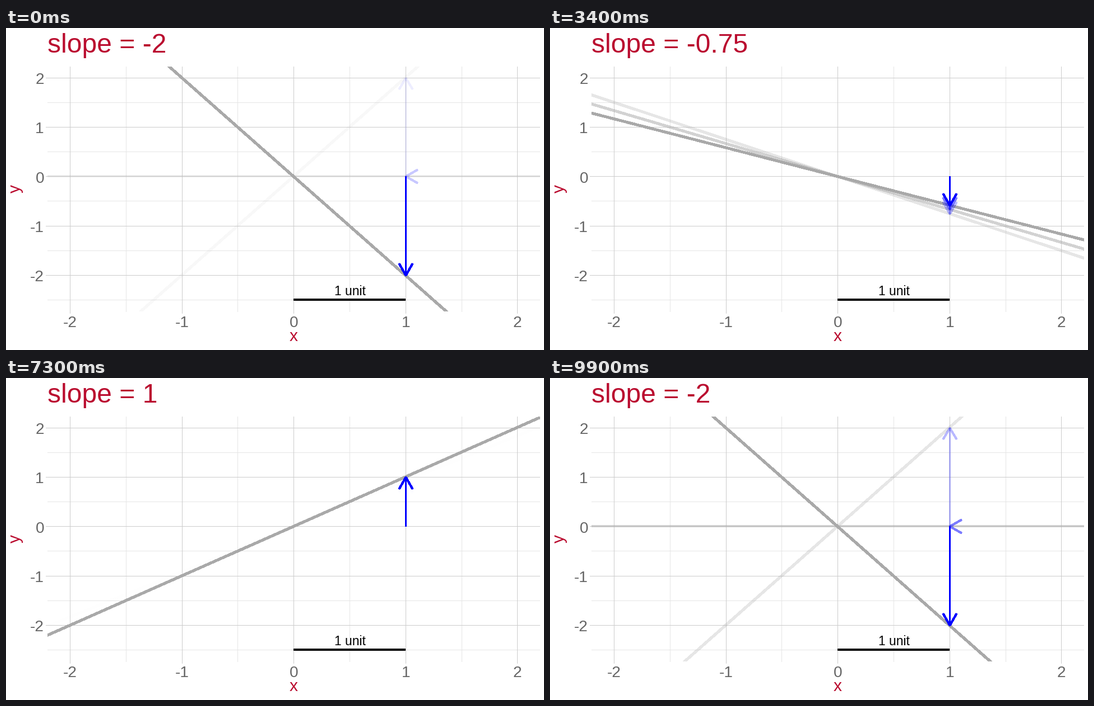
These frames come from a looping animation (960x576 px, 10 s). A matplotlib script:

```python
import math

import matplotlib.pyplot as plt
import numpy as np
from matplotlib.animation import FuncAnimation
from matplotlib.patches import Rectangle

W, H, DPI = 960, 576, 96
FRAMES, INTERVAL = 100, 100
LEFT, RIGHT, TOP, BOTTOM = 74, 953, 69, 507
RED, GREY, LINE, BLUE = "#BA0C2F", "#666666", "#A9A9A9", "#0000FF"
THICK, ARROW = 4, 3
HEAD, HEAD_ANGLE = 24, math.radians(30)
TICK = 3
WAKE = 5

plt.rcParams["font.family"] = "Liberation Sans"


def pt(px):
    return px * 72 / DPI


def sx(x):
    return 513.7 + 199.55 * x


def sy(y):
    return 265.8 - 88.35 * y


# Each state holds, then moves linearly to the next; the last wraps around.
STATES = np.arange(-2, 2.01, 0.25)
SEGMENTS = 2 * len(STATES)
KNOTS = [max(0, math.ceil(FRAMES * n / SEGMENTS) - 1) for n in range(SEGMENTS + 1)]
VALUES = np.append(np.repeat(STATES, 2), STATES[0])


def slope_at(frame):
    return float(np.interp(frame % FRAMES, KNOTS, VALUES))


def state_at(frame):
    landed = [v for k, v in zip(KNOTS, VALUES) if k <= frame]
    return landed[-1]


fig = plt.figure(figsize=(W / DPI, H / DPI), dpi=DPI, facecolor="white")
ax = fig.add_axes([0, 0, 1, 1])
ax.set_xlim(0, W)
ax.set_ylim(H, 0)
ax.axis("off")
panel = Rectangle((LEFT, TOP), RIGHT - LEFT, BOTTOM - TOP, transform=ax.transData)


def place(line, xs, ys, width):
    """Put vertices on whole pixels, centred for odd pen widths."""
    shift = width % 2 / 2
    line.set_data(np.floor(xs) + shift, np.floor(ys) + shift)


def stroke(xs, ys, color, width, alpha=1, clip=True):
    line, = ax.plot([], [], color=color, lw=pt(width), alpha=alpha,
                    antialiased=False, snap=False, solid_capstyle="butt",
                    solid_joinstyle="round", clip_on=clip)
    if clip:
        line.set_clip_path(panel)
    place(line, xs, ys, width)
    return line


def label(x, y, text, size, color, ha="center", **kw):
    return ax.text(x, y, text, fontsize=pt(size), color=color, ha=ha,
                   va="baseline", **kw)


def grid(xs, ys, color, tick=0):
    for x in xs:
        stroke([sx(x)] * 2, [TOP, BOTTOM + tick], color, 1, clip=False)
    for y in ys:
        stroke([LEFT - tick, RIGHT - 1], [sy(y)] * 2, color, 1, clip=False)


grid(np.arange(-1.5, 2), np.arange(-2.5, 2), "#E5E5E5")
grid(range(-2, 3), range(-2, 3), "#CCCCCC", TICK)
for v in range(-2, 3):
    label(sx(v), 535, str(v), 28, GREY)
    label(68, sy(v) + 10.8, str(v), 28, GREY, "right")
label(513, 560, "x", 30, RED)
label(25, 287.5, "y", 30, RED, rotation=90, rotation_mode="anchor")
title = label(LEFT, 44, "", 48, RED, "left")

# Oldest trace first, the current one (lag 0) on top.
lags = range(WAKE - 1, -1, -1)
fade = {lag: (1 - lag / WAKE) ** 3 for lag in lags}
lines = {lag: stroke([], [], LINE, THICK, fade[lag]) for lag in lags}
arrows = {lag: [stroke([], [], BLUE, ARROW, fade[lag]) for _ in range(2)]
          for lag in lags}

stroke([sx(0), sx(1)], [sy(-2.5)] * 2, "black", THICK)
label(sx(0.5), 478, "1 unit", 22.7, "black")


def head_points(slope):
    x, y = sx(1), sy(slope)
    # A zero-length arrow points left.
    back = 0 if slope == 0 else math.copysign(math.pi / 2, slope)
    a, b = back - HEAD_ANGLE, back + HEAD_ANGLE
    return ([x + HEAD * math.cos(a), x, x + HEAD * math.cos(b)],
            [y + HEAD * math.sin(a), y, y + HEAD * math.sin(b)])


def update(frame):
    title.set_text(f"slope = {state_at(frame):g}")
    for lag in lags:
        m = slope_at(frame - lag)
        place(lines[lag], [sx(-2.3), sx(2.3)], [sy(-2.3 * m), sy(2.3 * m)], THICK)
        shaft, head = arrows[lag]
        place(shaft, [sx(1), sx(1)], [sy(0), sy(m)], ARROW)
        place(head, *head_points(m), ARROW)
    return []


anim = FuncAnimation(fig, update, frames=FRAMES, interval=INTERVAL,
                     init_func=lambda: update(0), repeat=True,
                     repeat_delay=0, blit=False)
plt.show()
```
